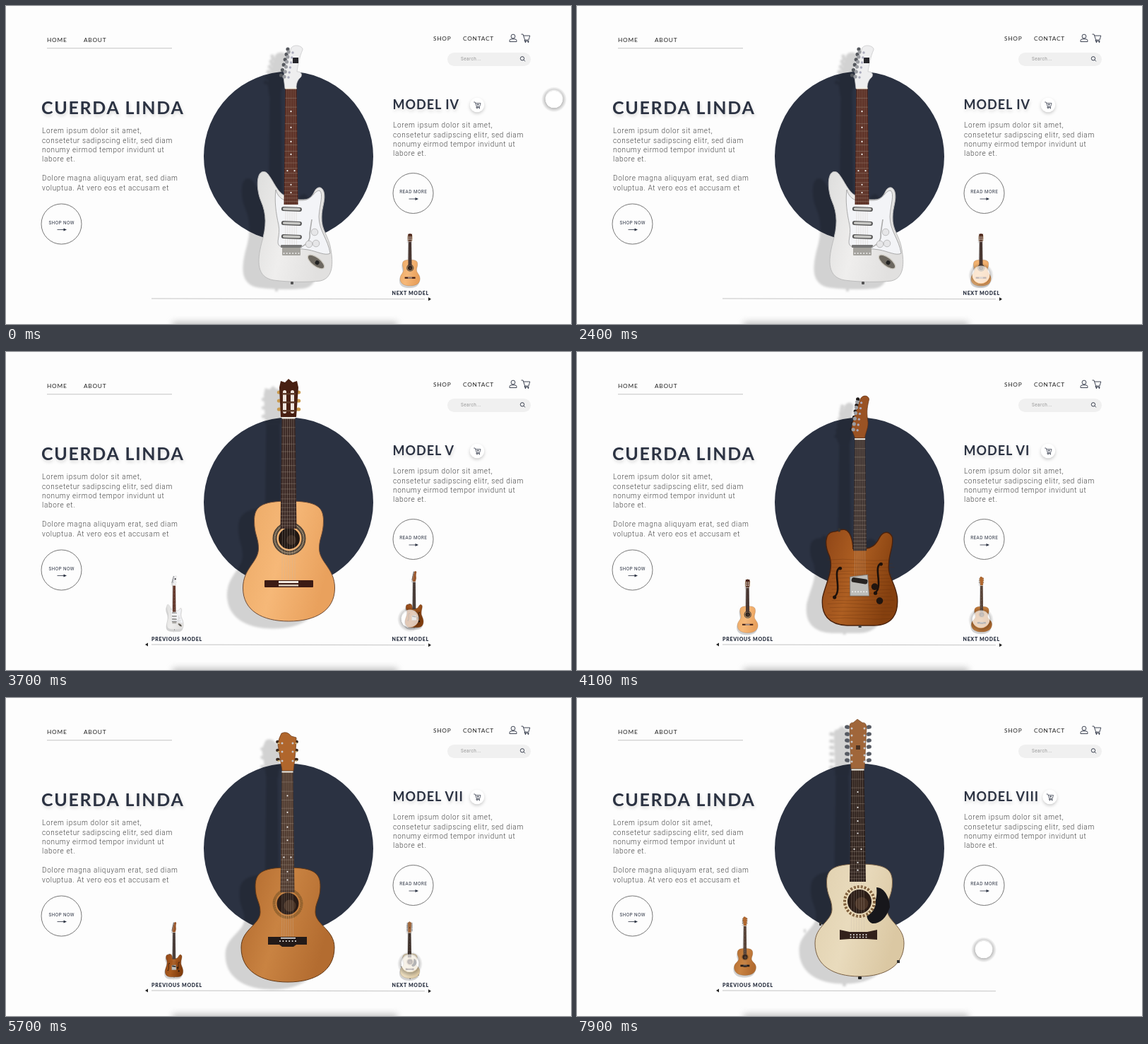
Recreate the animation shown at these times as an HTML page. Size 800x450 px, loop 8000 ms.

```html
<!DOCTYPE html>
<html lang="en">
<head>
<meta charset="utf-8">
<title>Guitar shop</title>
<style>
html, body { margin: 0; width: 100%; height: 100%; overflow: hidden; background: #fdfdfd; }
svg { display: block; width: 800px; height: 450px; }
text { font-family: Lato, sans-serif; fill: #2b3242; white-space: pre; }
.nav { font-size: 8.3px; letter-spacing: .75px; fill: #222; }
.title { font-size: 25px; font-weight: 700; letter-spacing: 1.7px; }
.model { font-size: 18px; font-weight: 700; letter-spacing: 1px; }
.title, .model { filter: drop-shadow(1px 3px 2px #0002); }
.copy { font: 300 10px Roboto, sans-serif; letter-spacing: .69px; fill: #444; }
.btn { font: 6.4px Roboto, sans-serif; letter-spacing: .45px; }
.search { font: 6.4px Roboto, sans-serif; letter-spacing: .45px; fill: #999; }
.label { font-size: 7px; font-weight: 900; letter-spacing: .7px; }
.raised { filter: drop-shadow(0 2px 2px #0003); }
.line { fill: none; stroke: #2b3242; stroke-width: .9; }
</style>
</head>
<body>
<svg id="stage" viewBox="0 0 800 450"></svg>
<script>
const clamp = v => Math.max(0, Math.min(1, v));
const smooth = v => (v = clamp(v)) * v * (3 - 2 * v);
const mix = (a, b, k) => a + (b - a) * k;
const $ = id => document.getElementById(id);

// Small SVG builders
const path = (d, fill, extra = '') => `<path d="${d}" fill="${fill}" ${extra}/>`;
const line = (d, color, w) => path(d, 'none', `stroke="${color}" stroke-width="${w}"`);
const dot = (x, y, r, fill, extra = '') => `<circle cx="${x}" cy="${y}" r="${r}" fill="${fill}" ${extra}/>`;
const rect = (x, y, w, h, fill, r = 0, extra = '') =>
  `<rect x="${x}" y="${y}" width="${w}" height="${h}" rx="${r}" fill="${fill}" ${extra}/>`;
const text = (cls, x, y, s, extra = '') => `<text class="${cls}" x="${x}" y="${y}" ${extra}>${s}</text>`;
const grad = (id, ...stops) => `<linearGradient id="${id}" x2="1" y2=".35">` +
  stops.map((c, i) => `<stop offset="${i / (stops.length - 1)}" stop-color="${c}"/>`).join('') + '</linearGradient>';

// Fretboard from half width w1 at y1 to w2 at y2, strings running on to the bridge
function neck(c, w1, y1, w2, y2, bridge, fill, marks) {
  let out = path(`M${c - w1} ${y1}H${c + w1}L${c + w2} ${y2}H${c - w2}Z`, fill);
  const at = n => (1 - 2 ** (-n / 12)) / (1 - 2 ** (-20 / 12));
  for (let n = 1; n < 20; n++) {
    const k = at(n), w = mix(w1, w2, k), y = mix(y1, y2, k);
    out += line(`M${c - w} ${y}H${c + w}`, '#a99a8c', .35);
    if (marks && [3, 5, 7, 9, 12, 15, 17].includes(n)) {
      const my = mix(y1, y2, at(n - .5));
      out += n == 12 ? dot(c - 5, my, 1.1, '#eee') + dot(c + 5, my, 1.1, '#eee') : dot(c, my, 1.1, '#eee');
    }
  }
  for (let i = -2.5; i < 3; i++)
    out += line(`M${c + i * w1 * .3} ${y1}L${c + i * w2 * .32} ${bridge}`, '#c4b8aa', .3);
  return out + rect(c - w1, y1 - 1.5, w1 * 2, 2, '#f4efe4');
}

// Symmetric acoustic body: top, upper bout, waist, lower bout, bottom
function body(c, t, [wu, yu], [ww, yw], [wl, yl], b, fill, edge) {
  const half = d => `M${c} ${t}C${c + d * wu * .82} ${t} ${c + d * wu} ${mix(t, yu, .3)} ${c + d * wu} ${yu}` +
    `C${c + d * wu} ${mix(yu, yw, .5)} ${c + d * ww} ${mix(yu, yw, .6)} ${c + d * ww} ${yw}` +
    `C${c + d * ww} ${mix(yw, yl, .35)} ${c + d * wl} ${mix(yw, yl, .5)} ${c + d * wl} ${yl}` +
    `C${c + d * wl} ${mix(yl, b, .68)} ${c + d * wl * .58} ${b} ${c} ${b}`;
  return path(half(1) + half(-1), fill, `stroke="${edge}" stroke-width="1"`);
}

const hole = (x, y, r, ring, dash = '') =>
  dot(x, y, r + 4, 'none', `stroke="${ring}" stroke-width="4" stroke-dasharray="${dash}"`) +
  dot(x, y, r, '#2a1c16') + dot(x + 3, y + 3, r * .55, '#4a3426');

const pegs = (xs, ys, fill, r = 2.5) => xs.map(x => ys.map(y =>
  `<ellipse cx="${x}" cy="${y}" rx="${r + .6}" ry="${r}" fill="${fill}"/>` +
  dot(x + (x < 400 ? 5 : -5), y, 1.5, '#c9c9cc')).join('')).join('');

const slantPegs = (n, x, y, dx, dy, fill) => Array.from({ length: n }, (_, i) =>
  dot(x + dx * i, y + dy * i, 2.6, fill) + dot(x + dx * i + 6, y + dy * i + 1, 1.7, '#aab')).join('');

const fhole = (x, y) => line(`M${x + 4} ${y - 22}c-6 2 -5 10 -4 20s1 18 -5 22`, '#1c100a', 2.6) +
  dot(x + 4, y - 21, 2.4, '#1c100a') + dot(x - 4, y + 20, 2.6, '#1c100a');

const pickup = y => rect(390, y, 29, 6, '#555', 3, `transform="rotate(2 404 ${y})"`) +
  rect(392, y + 1.2, 25, 3.4, '#c9c9c6', 1.7, `transform="rotate(2 404 ${y})"`);

const pins = (c, y, n, w) => Array.from({ length: n }, (_, i) => dot(c + (i / (n - 1) - .5) * w, y, 1, '#eee')).join('');

const art = [
  // White electric
  slantPegs(6, 399, 61, -1.9, 7.4, '#55585e') +
  path('M395 117L393 101C396 86 400 70 404 59C409 53 421 57 420 62C416 70 413 85 412 93C418 92 421 98 416 102C412 106 411 111 411 117Z', '#eeeeef', 'stroke="#c4c4c6" stroke-width=".7"') +
  rect(406, 73, 8, 8, '#26262b') + slantPegs(6, 400, 65, -1.2, 7, '#9b9da2') +
  path('M362 235C354 239 355 262 361 276C369 294 369 312 362 335C355 362 355 384 379 388C400 391 430 391 445 389C464 385 463 362 460 345C457 324 446 318 447 298C447 285 453 274 450 263C447 254 440 256 437 262C431 275 425 274 414 274L394 268C384 263 379 248 371 238C368 234 365 234 362 235Z', 'url(#w0)', 'stroke="#bdbdbd" stroke-width="1"') +
  path('M382 260C384 268 390 274 396 275H420C434 275 436 261 444 261C450 266 444 281 443 298C443 318 456 330 459 350C452 354 440 347 428 345L388 340C381 336 389 325 386 310C382 292 380 276 382 260Z', '#f3f4f7', 'stroke="#999" stroke-width=".8"') +
  neck(403.5, 8, 117, 10, 281, 345, '#57291e', true) +
  [284.5, 304.5, 323.5].map(pickup).join('') +
  rect(389, 338, 30, 4, '#777', 1) + rect(391, 342, 26, 11, '#a5a39e', 1) + pins(404, 350, 6, 21) +
  line('M418 341Q432 334 430 322L433 302', '#aaa', 1.6) +
  [[437, 320], [429, 337], [439, 336]].map(([x, y]) => dot(x, y, 4.8, '#e6e6e8', 'stroke="#aaa" stroke-width=".7"')).join('') +
  '<g transform="rotate(38 439 362)"><ellipse cx="439" cy="362" rx="14" ry="6" fill="#6d6860" stroke="#c9c5bb" stroke-width="1.2"/><circle cx="441" cy="362" r="3" fill="#222"/></g>' +
  rect(403, 390, 4, 4, '#555', 1),

  // Classical
  pegs([387, 414], [57, 69, 81], '#c99a4e', 2.6) +
  path('M389 92L387 50L389 41L395 43L400 38L406 43L412 41L414 50L411 92Z', '#482012') +
  rect(392, 54, 5, 33, '#eee4dc', 2.5) + rect(403, 54, 5, 33, '#eee4dc', 2.5) +
  [58, 70, 82].map(y => rect(391, y, 19, 2.5, '#5c3a28')).join('') +
  body(400.5, 211, [49, 239], [43, 278], [65, 334], 381, 'url(#w1)', '#6d4b36') +
  dot(401, 264, 20.5, 'none', 'stroke="#514437" stroke-width="6"') +
  dot(401, 264, 20.5, 'none', 'stroke="#c6b292" stroke-width="2" stroke-dasharray="1 1"') +
  dot(401, 264, 15, '#201713') + dot(404, 266, 7, '#3b2b22') +
  neck(400, 9.5, 94, 11.5, 250, 326, '#3a2824') +
  rect(366, 323, 69, 10, '#3c1b14', 1) + rect(386, 324, 28, 3, '#f2e9df') + rect(386, 329, 28, 2.5, '#d8c9b9'),

  // Semi-hollow electric
  slantPegs(6, 397, 66, -1.7, 8.5, '#211c1b') +
  path('M393 121L388 108C390 95 396 80 400 67C403 59 412 60 413 66C411 75 409 82 411 95C413 106 408 112 407 121Z', '#9a5324', 'stroke="#5e2d12" stroke-width=".7"') +
  slantPegs(6, 396, 70, -1.1, 7.8, '#9b9da2') +
  path('M362 254C349 256 350 275 357 289C363 309 352 325 347 347C344 372 356 386 382 387H420C446 387 455 370 453 347C450 325 439 318 441 300C441 285 448 275 446 262C442 252 433 253 428 262C422 274 416 277 408 278H390C390 266 386 252 378 251C372 250 369 254 362 254Z', 'url(#w2)', 'stroke="#4a220d" stroke-width="1.4"') +
  Array.from({ length: 17 }, (_, i) => line(`M${354 + i % 3 * 3} ${294 + i * 5.2}q22 ${i % 4 - 2} 44 0t45 0`, '#5d2a0e44', 1)).join('') +
  fhole(368, 327) + fhole(426, 321) +
  neck(400, 7.5, 123, 9.5, 281, 340, '#3a2e2b') +
  path('M386 318L411 315L413 345H386Z', '#bdbdb9', 'stroke="#777" stroke-width=".8"') +
  rect(388, 320, 23, 7, '#262321', 3, 'transform="rotate(9 399 323)"') + pins(399.5, 339, 6, 20) +
  dot(421, 332, 4.8, '#20150f') + dot(428, 352, 4.8, '#20150f') +
  rect(369, 249, 3, 5, '#333') + rect(398, 387, 4, 3, '#444'),

  // Amber acoustic
  pegs([385, 411], [62, 74, 87], '#3a2a20', 2.2) +
  path('M391 103L385 66Q386 57 390 50Q398 46 404 54L411 56Q411 70 407 103Z', '#b0662c', 'stroke="#67381a" stroke-width=".7"') +
  pegs([386, 411], [64, 76, 89], '#d2b77a', 1.1) +
  body(399, 240, [46, 267], [39, 303], [66, 353], 402, 'url(#w3)', '#633815') +
  hole(399, 291, 15.5, '#7f5728', '1 .6') +
  neck(398.5, 8, 105, 10, 275, 342, '#4c372c', true) +
  path('M371 338H426V349H411L407 352H391L387 349H371Z', '#231a18') + pins(399, 344, 6, 22) +
  rect(389, 339, 21, 1.5, '#eee'),

  // Pale twelve-string
  pegs([382.5, 413.5], [41, 51, 60, 69, 79, 88], '#565a62', 2.8) +
  path('M388 100L386 41Q386 34 391 35L397 30L404 35Q409 34 410 41L407 100Z', '#a0663a', 'stroke="#754522" stroke-width=".7"') +
  pegs([384, 412], [43, 53, 62, 71, 81, 90], '#5d626b', 1) + rect(395, 67, 6, 6, '#4a3020') +
  body(400, 235, [46.5, 261], [39, 299], [63, 347], 394, 'url(#w4)', '#796044') +
  path('M424 268C436 268 443 284 443 296C438 312 428 320 418 319C411 316 409 308 411 303C420 299 426 284 424 268Z', '#17171b') +
  dot(400, 288, 21, 'none', 'stroke="#f0dfb9" stroke-width="4"') +
  hole(400, 288, 17, '#80603e', '3 2') +
  neck(397.5, 9, 102, 11.5, 260, 333, '#2e211c', true) +
  path('M372 328L386 331H411L425 328V342L411 341H386L372 342Z', '#33211b') + pins(398.5, 335, 6, 22) + pins(398.5, 338.5, 6, 22) +
  rect(398, 394, 5, 4, '#222', 1) + rect(343, 317, 3, 5, '#333') + rect(453, 371, 4, 4, '#333')
];

// Main centre, then thumbnail centres and scales on the right and left
const poses = [
  { main: [407, 225], next: [572, 358, .22], prev: [239, 355, .228] },
  { main: [400, 210], next: [572, 359, .217], prev: [241, 360, .22] },
  { main: [400, 224], next: [578, 350, .244], prev: [238, 356, .238] },
  { main: [399, 225], next: [573, 357, .221], prev: [238, 351, .235] },
  { main: [400, 214], next: [572, 357, .221], prev: [238, 355, .22] }
];
const models = ['IV', 'V', 'VI', 'VII', 'VIII'];

const cart = line('M-6 -5H-3.5L-.8 3H4.5L6.3 -3H-2.6M-.8 3L-1.5 4.5H5', '#2b3242', .9) +
  dot(0, 6, .9, '#2b3242') + dot(4, 6, .9, '#2b3242');
const arrow = (x, y) => line(`M${x} ${y}h10`, '#2b3242', .8) + path(`M${x + 9} ${y - 2}l4.5 2l-4.5 2z`, '#2b3242');
const button = (x, y, s) => dot(x, y, 28.5, 'none', 'stroke="#555" stroke-width=".8"') +
  text('btn', x + .2, y, s, 'text-anchor="middle"') + arrow(x - 6, y + 8);
const copy = (x, y, lines) => lines.map((s, i) => text('copy', x, y + i * 13.4, s)).join('');
const lorem = ['Lorem ipsum dolor sit amet,', 'consetetur sadipscing elitr, sed diam',
  'nonumy eirmod tempor invidunt ut', 'labore et.'];

$('stage').innerHTML = `<defs>
  ${grad('w0', '#dededd', '#efeeed', '#e1e0df')}${grad('w1', '#eba965', '#f6b878', '#e9a15d')}
  ${grad('w2', '#8d4416', '#ae5f22', '#85400f')}${grad('w3', '#b0682c', '#c98342', '#b36c30')}
  ${grad('w4', '#e0d0ae', '#e9dbbd', '#dbc8a3')}
  <radialGradient id="halo"><stop offset=".66" stop-opacity="0"/>
    <stop offset=".68" stop-opacity=".24"/><stop offset="1" stop-opacity="0"/></radialGradient>
  <filter id="shade" x="-20%" y="-10%" width="140%" height="120%">
    <feColorMatrix values="0 0 0 0 0 0 0 0 0 0 0 0 0 0 0 0 0 0 .17 0"/><feGaussianBlur stdDeviation="1.6"/></filter>
  <filter id="soft" x="-20%" y="-200%" width="140%" height="500%"><feGaussianBlur stdDeviation="5"/></filter>
  ${art.map((a, i) => `<g id="g${i}">${a}</g>`).join('')}</defs>
  <rect width="800" height="450" fill="#fdfdfd"/>
  ${rect(236, 447, 318, 14, '#888', 0, 'opacity=".5" filter="url(#soft)"')}
  ${text('nav', 58, 51, 'HOME')}${text('nav', 110, 51, 'ABOUT')}${line('M58 59.8H235', '#c4c4c4', 1)}
  ${text('nav', 605, 49, 'SHOP')}${text('nav', 647, 49, 'CONTACT')}
  <g class="line"><circle cx="718" cy="43" r="2.9"/><path d="M713 50.5V49Q713 46.8 716 46.8H720Q723 46.8 723 49V50.5Z"/></g>
  <g transform="translate(735.5 45)">${cart}</g>
  ${rect(625, 66, 118, 19, '#f0f0f0', 9.5)}${text('search', 644, 77.2, 'Search...')}
  <g class="line"><circle cx="731" cy="74.3" r="2.7"/><path d="M733 76.3l2 2"/></g>
  ${dot(400, 212.8, 120, '#2b3242')}
  ${text('title', 50, 153, 'CUERDA LINDA')}
  ${copy(51, 180.2, [...lorem, '', 'Dolore magna aliquyam erat, sed diam', 'voluptua. At vero eos et accusam et'])}
  ${button(78.5, 308.5, 'SHOP NOW')}
  ${models.map((m, i) => text('model', 547.5, 146, 'MODEL ' + m, `id="m${i}"`)).join('')}
  <g id="cart">${dot(0, 0, 10.3, '#fff', 'class="raised"')}<g transform="scale(.8)">${cart}${line('M-.5 -.5h4M1.5 -2.2v3.6', '#2b3242', .9)}</g></g>
  ${copy(548, 172.2, lorem)}
  ${button(576.5, 265, 'READ MORE')}
  ${line('M206 414L593 414.8', '#c4c4c4', 1)}
  <g id="prev">${text('label', 206, 409, 'PREVIOUS MODEL')}${path('M201 411.5V416.5L197 414Z', '#222')}</g>
  <g id="next">${text('label', 546.5, 409, 'NEXT MODEL')}${path('M598 412.3V417.3L602 414.8Z', '#222')}</g>
  ${art.map((_, i) => `<g id="s${i}"><use href="#g${i}" filter="url(#shade)"/></g>`).join('')}
  ${art.map((_, i) => `<use id="u${i}" href="#g${i}"/>`).join('')}
  <g id="cursor">${dot(0, 1.3, 18, 'url(#halo)')}${dot(0, 0, 12.5, '#fff', 'fill-opacity=".68"')}</g>`;

const LOOP = 8000, SLIDE = 750, starts = [2450, 3720, 5000, 6350];
const track = [[0, 776, 131], [50, 776, 131], [900, 572, 378], [2400, 572, 380], [3100, 572, 377], [3700, 572, 377],
  [4100, 572, 378], [5700, 572, 375], [6600, 573, 377], [7100, 574, 377], [7700, 574, 377], [7900, 576, 355], [LOOP, 576, 355]];

function cursorAt(t) {
  const i = track.findIndex(k => k[0] > t), [t0, x0, y0] = track[i - 1], [t1, x1, y1] = track[i];
  const k = smooth((t - t0) / (t1 - t0));
  return [mix(x0, x1, k), mix(y0, y1, k)];
}

const fade = (id, v) => $(id).setAttribute('opacity', clamp(v));
const move = (id, v) => $(id).setAttribute('transform', v);

function draw(t) {
  // Slide position, and a later one that the shadows follow
  let pos = 0, late = 0;
  for (const s of starts) {
    const u = clamp((t - s) / SLIDE);
    pos += 1 - (1 - u) ** 8;
    late += smooth((u - .36) / .14);
  }
  poses.forEach((p, i) => {
    const rel = i - pos, k = clamp(Math.abs(rel)), [cx, cy] = p.main;
    const [x, y, s] = rel > 0 ? p.next : p.prev;
    const scale = mix(1, s, k), px = mix(cx, x, k), py = mix(cy, y, k);
    const place = (dx, dy) => `translate(${px + dx} ${py + dy}) scale(${scale}) translate(${-cx} ${-cy})`;
    const far = clamp(Math.abs(i - late));
    move('u' + i, place(0, 0));
    move('s' + i, place(mix(-22, -1, far), mix(10, 3, far)));
    fade('u' + i, 2 - Math.abs(rel));
    fade('s' + i, 2 - Math.abs(rel));
    fade('m' + i, 1 - Math.abs(rel));
  });
  fade('prev', pos);
  fade('next', 4 - pos);
  move('cart', `translate(${667 + 2.5 * clamp(pos - 3)} 140)`);
  move('cursor', `translate(${cursorAt(t)})`);
}

function tick() {
  draw(performance.now() % LOOP);
  requestAnimationFrame(tick);
}
tick();
</script>
</body>
</html>
```
